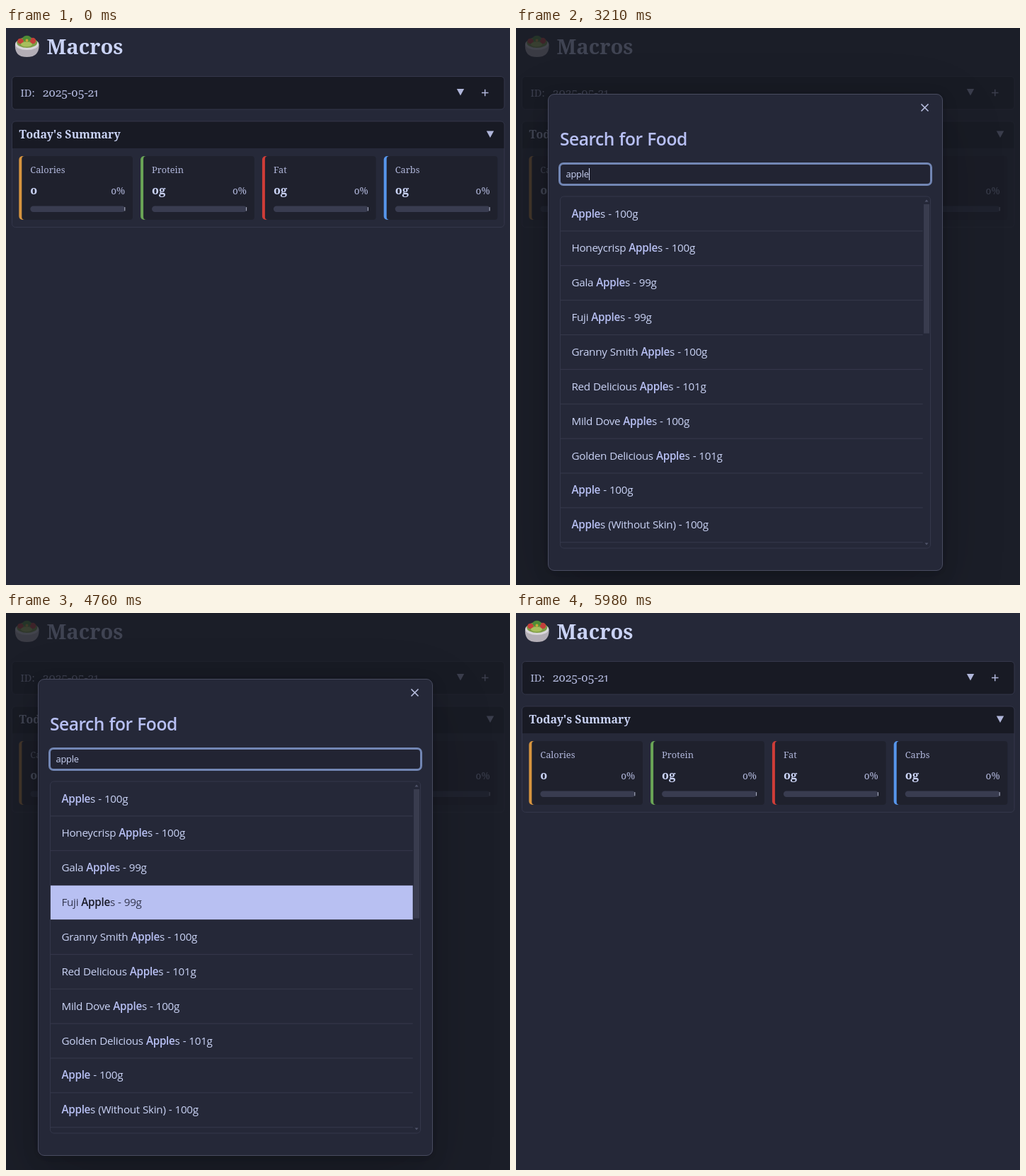
Write an HTML page that moves like this. It is 712 by 787 pixels and loops after 8 s.

```html
<!DOCTYPE html>
<html lang="en">
<head>
<meta charset="utf-8">
<title>Macros</title>
<style>
  html, body { margin: 0; width: 100%; height: 100%; overflow: hidden; background: #252838; }
  svg, #dim, #panel { position: absolute; left: 0; top: 0; }
  svg { width: 712px; height: 787px; }
  #dim { width: 712px; height: 787px; background: rgba(25, 27, 37, .78); }
  #panel {
    left: 45px; width: 558px; box-sizing: border-box;
    background: #252838; border: 1px solid #494c60; border-radius: 9px;
    box-shadow: 0 2px 7px rgba(0,0,0,.07), 0 6px 25px rgba(0,0,0,.11), 0 30px 90px rgba(0,0,0,.18);
  }
  text { white-space: pre; }
  #page text { font-family: "Noto Serif", serif; font-variant-numeric: oldstyle-nums proportional-nums; fill: #b0b6da; }
  #page .strong { font-weight: 700; fill: #cad3f5; }
  #dialog text { font-family: "Open Sans", "Noto Sans", sans-serif; letter-spacing: -.02em; word-spacing: .03em; fill: #cad3f5; }
  #dialog .title { font-weight: 600; fill: #b8c0f4; }
  #dialog .hint { font-style: italic; fill: #a9b0d6; }
  .row tspan { font-weight: 600; fill: #b8c0f4; }
  #dialog .selected text { fill: #343750; }
  .selected tspan { fill: #181926; }
</style>
</head>
<body>
<svg id="page"></svg>
<div id="modal">
  <div id="dim"></div>
  <div id="panel"></div>
  <svg><g id="dialog"></g></svg>
</div>
<script>
const LOOP = 8000, OPEN = 1190, RESULTS = 3210, CLOSE = 5980;
const BLINK = 530, FADE = 200, ROW = 48.87, LIST_TOP = 145.5;
const KEYS = [1930, 2130, 2330, 2530, 2800];
// [time, row] for each arrow key press
const MOVES = [[3590, 0], [3860, 1], [4210, 2], [4572, 3], [4855, 2], [5142, 1], [5470, 0]];
const FOODS = ["Apples - 100g", "Honeycrisp Apples - 100g", "Gala Apples - 99g", "Fuji Apples - 99g",
  "Granny Smith Apples - 100g", "Red Delicious Apples - 101g", "Mild Dove Apples - 100g",
  "Golden Delicious Apples - 101g", "Apple - 100g", "Apples (Without Skin) - 100g"];
const CARDS = [["Calories", "0", "#d6943f"], ["Protein", "0g", "#6aa556"],
  ["Fat", "0g", "#cf3d38"], ["Carbs", "0g", "#5796ec"]];

const $ = id => document.getElementById(id);
const text = (x, y, size, str, attrs = "") => `<text x="${x}" y="${y}" font-size="${size}" ${attrs}>${str}</text>`;
const rect = (x, y, w, h, r, fill, attrs = "") =>
  `<rect x="${x}" y="${y}" width="${w}" height="${h}" rx="${r}" fill="${fill}" ${attrs}/>`;
const blob = (x, y, rx, ry, fill) => `<ellipse cx="${x}" cy="${y}" rx="${rx}" ry="${ry}" fill="${fill}"/>`;
const path = (d, fill, attrs = "") => `<path d="${d}" fill="${fill}" ${attrs}/>`;
const arrow = (x, y) => path(`M${x - 5.2} ${y - 4.5}h10.4l-5.2 9.5z`, "#b0b6da");
const EDGE = 'stroke="#34374a"';

const bowl = path("M13 23h33.5c1 10-4 15-9 17q-8 2-16 0c-5-2-9.5-7-8.5-17", "#b3aeb6")
  + blob(29.7, 23, 16.7, 8, "#d9d6da") + blob(29.7, 20.5, 14.5, 7.5, "#7d9c45")
  + blob(20.5, 18.5, 4.2, 3.8, "#c4403a") + blob(38, 18, 4.2, 4.2, "#c4403a")
  + blob(29.5, 15, 6, 4.2, "#4f8c36") + blob(29, 23, 8, 3.5, "#a8bf5c")
  + blob(29.5, 17.5, 2, 2, "#c9a53c");

const card = ([label, value, color], i) => {
  const x = 18.3 + 171.8 * i;
  return rect(x, 181, 12, 90, 5, color) + rect(x + 4, 181, 156.7, 90, 4, "#1f212d")
    + text(x + 16, 204.5, 12.8, label)
    + text(x + 16, 235, 17, value, 'class="strong"')
    + text(x + 149.8, 235, 13.5, "0%", 'text-anchor="end"')
    + rect(x + 16, 251.5, 134, 8.5, 4.2, "#393c50")
    + rect(x + 149, 253, 1, 5.5, .5, "#b4b8cc");
};

$("page").innerHTML = bowl
  + text(57.5, 37, 29.2, "Macros", 'class="strong"')
  + rect(8.5, 68.5, 695.5, 46.5, 5, "#181a24", EDGE)
  + text(20.5, 97, 14.6, "ID:")
  + text(52, 97, 16.8, "2025-05-21", 'font-weight="500"')
  + arrow(642, 90.5)
  + path("M672 91.5h9.5M676.7 86.7v9.5", "none", 'stroke="#b0b6da" stroke-width="1.5"')
  + rect(8.5, 132, 695.5, 149.5, 5, "#262939", EDGE)
  + path("M9 170v-32.5q0-5 5-5h684.5q5 0 5 5v32.5z", "#181a24")
  + text(18.5, 156, 15.9, "Today's Summary", 'class="strong"')
  + arrow(684, 150)
  + CARDS.map(card).join("");

// Dialog parts are placed relative to the panel's top edge.
const row = (food, i) => {
  const y = LIST_TOP + ROW * i;
  return `<g class="row">${rect(63, y, 511.7, ROW - .5, 0, "#b8c0f2", 'opacity="0"')}`
    + rect(63, y + ROW - 1, 511.7, 1, 0, "#36394c")
    + text(78.5, y + 29, 15.25, food.replace("Apple", "<tspan>Apple</tspan>")) + "</g>";
};
$("dialog").innerHTML =
  path("M572.5 14.5l10 10m0-10l-10 10", "none", 'stroke="#bac1e2" stroke-width="1.6"')
  + text(62, 73, 24.6, "Search for Food", 'class="title"')
  + rect(61.5, 98.5, 525, 30, 5.5, "#222433", 'stroke="#7286b4" stroke-width="3"')
  + text(70.5, 118, 12.9, "", 'id="query"')
  + rect(0, 105, 1, 17, 0, "#cad3f5", 'id="caret"')
  + text(323.5, 168, 16, "Searching...", 'class="hint" id="hint" text-anchor="middle"')
  + `<g id="results">${rect(62.5, 145, 523, 497, 5, "none", EDGE)}${FOODS.map(row).join("")}`
  + rect(576, 156, 8, 182.5, 0, "#393c4e")
  + path("M577.5 152.5h5l-2.5-3zM577.5 634.5h5l-2.5 3z", "#50546a") + "</g>";
const rows = [...document.querySelectorAll(".row")];

const bezier = (a, b, s) => 3 * a * s * (1 - s) ** 2 + 3 * b * s * s * (1 - s) + s ** 3;
function ease(x) {
  if (x <= 0 || x >= 1) return x <= 0 ? 0 : 1;
  let lo = 0, hi = 1;
  for (let i = 0; i < 16; i++) {
    const mid = (lo + hi) / 2;
    if (bezier(.25, .25, mid) < x) lo = mid; else hi = mid;
  }
  return bezier(.1, 1, lo);
}
const show = (el, on) => el.style.display = on ? "" : "none";

function drawRows(t) {
  const last = MOVES.filter(m => m[0] <= t).length - 1;
  const [start, current] = MOVES[last] || [0, -1];
  const previous = last > 0 ? MOVES[last - 1][1] : -1;
  const p = ease((t - start) / FADE);
  rows.forEach((el, i) => {
    el.classList.toggle("selected", i === current);
    el.firstChild.setAttribute("opacity", i === current ? p : i === previous ? 1 - p : 0);
  });
}

function draw(t) {
  const open = t >= OPEN && t < CLOSE;
  show($("modal"), open);
  if (!open) return;
  $("modal").style.opacity = ease((t - OPEN + 30) / 170);

  const typed = KEYS.filter(k => k <= t).length;
  const found = t >= RESULTS;
  const [top, height] = found ? [93, 674] : typed ? [320, 220] : [342, 176];
  $("panel").style.top = top + "px";
  $("panel").style.height = height + "px";
  $("dialog").setAttribute("transform", `translate(0 ${top})`);

  $("query").textContent = "apple".slice(0, typed);
  const width = typed ? $("query").getComputedTextLength() : 0;
  $("caret").setAttribute("x", Math.round(70.5 + width));
  const lastInput = typed ? KEYS[typed - 1] : OPEN;
  show($("caret"), Math.floor((t - lastInput) / BLINK) % 2 === 0);

  show($("hint"), typed && !found);
  show($("results"), found);
  drawRows(t);
}

const began = performance.now();
function tick() {
  draw((performance.now() - began) % LOOP);
  requestAnimationFrame(tick);
}
tick();
</script>
</body>
</html>
```
